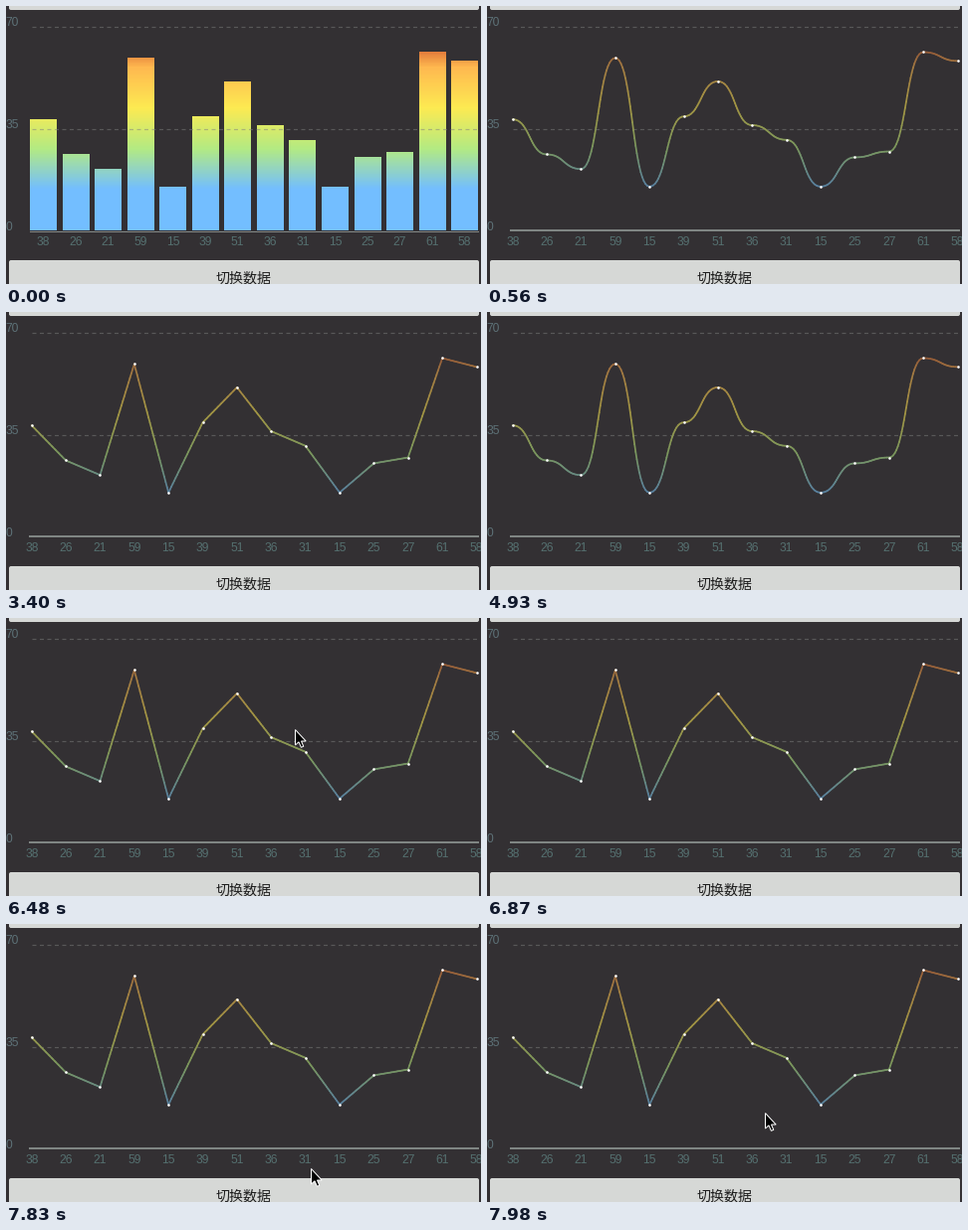
Animation, 477 px wide and 280 px high, one loop 8000 ms. Source, as a matplotlib script:

```python
import matplotlib.pyplot as plt
import numpy as np
from matplotlib.animation import FuncAnimation
from matplotlib.collections import LineCollection
from matplotlib.colors import LinearSegmentedColormap, to_rgb
from matplotlib.patches import FancyBboxPatch, PathPatch, Polygon
from matplotlib.path import Path

W, H, DPI = 477, 280, 72
LOOP, STEP = 8000, 20
VALUES = [38, 26, 21, 59, 15, 39, 51, 36, 31, 15, 25, 27, 61, 58]
N = len(VALUES)
TOP, BASE, PEAK = 20, 226, 70
LEFT, RIGHT = 24, 474
BACK = "#333033"
HEAT = LinearSegmentedColormap.from_list("heat", [
    (0.0, "#b71c1c"), (0.2, "#ffb950"), (0.4, "#fdea52"),
    (0.6, "#b4eb82"), (0.8, "#73beff"), (1.0, "#73beff")])

plt.rcParams["font.family"] = "Liberation Sans"
fig = plt.figure(figsize=(W / DPI, H / DPI), dpi=DPI, facecolor=BACK)
ax = fig.add_axes([0, 0, 1, 1])


def height(v):
    return BASE - v * (BASE - TOP) / PEAK


def label(x, y, text, ha="center", color="#557070"):
    return ax.text(x, y, text, size=12, ha=ha, va="baseline", color=color)


def button(y, h):
    ax.add_patch(FancyBboxPatch((5, y + 2), 468, h - 4, lw=0, fc="#d6d8d6",
                                boxstyle="round,pad=2,rounding_size=2"))


def heat_line(x, y):
    """Thin line tinted by height and dimmed toward the background."""
    pts = np.column_stack([x, y])
    mid = (y[1:] + y[:-1]) / 2
    tint = HEAT((mid - TOP) / (BASE - TOP))[:, :3]
    rgb = 0.55 * tint + 0.45 * np.array(to_rgb(BACK))
    segs = np.stack([pts[:-1], pts[1:]], axis=1)
    return ax.add_collection(LineCollection(
        segs, colors=rgb, linewidths=1.7, capstyle="round", zorder=3))


# Bars: one gradient clipped to all rectangles
bar_w = 26.8
bar_x = LEFT + np.arange(N) * (RIGHT - LEFT - bar_w) / (N - 1)
rects = []
for x, v in zip(np.round(bar_x), VALUES):
    r, t = x + 26.5, round(height(v))
    rects.append(Path([(x, BASE), (x, t), (r, t), (r, BASE), (x, BASE)],
                      closed=True))
ramp = HEAT(np.linspace(0, 1, BASE - TOP))[:, None, :]
bars = ax.imshow(ramp, extent=(LEFT, RIGHT + 1, BASE, TOP), aspect="auto",
                 interpolation="nearest", zorder=1)
ax.set(xlim=(0, W), ylim=(H, 0))
ax.axis("off")
bars.set_clip_path(PathPatch(Path.make_compound_path(*rects),
                             transform=ax.transData))
bar_axis, = ax.plot([LEFT, RIGHT], [226.5] * 2, color="#858b89", lw=1, zorder=2)
bar_labels = [label(x + bar_w / 2, 241, v) for x, v in zip(bar_x, VALUES)]

# Line charts: smooth with flat tangents at each point, and straight
px = np.linspace(25.7, 472.5, N)
py = np.array([height(v) for v in VALUES])
s = np.linspace(0, 1, 25)[:-1]
bx = 1.5 * s * (1 - s) + s ** 3
by = s * s * (3 - 2 * s)
dx, dy = np.diff(px)[:, None], np.diff(py)[:, None]


def joined(p, d, ease):
    return np.append((p[:-1, None] + d * ease).ravel(), p[-1])


smooth = heat_line(joined(px, dx, bx), joined(py, dy, by))
straight = heat_line(joined(px, dx, s), joined(py, dy, s))
dots, = ax.plot(px, py, "o", ms=2.6, mew=0, color="white", zorder=4)
line_axis, = ax.plot([LEFT, RIGHT], [226] * 2, color="#7f8583", lw=2, zorder=2)
line_labels = [label(x, 241, v) for x, v in zip(px, VALUES)]

# Fixed parts
for v in (35, 70):
    ax.plot([26, RIGHT], [height(v) + 0.5] * 2, color="#808080", alpha=0.5,
            lw=1.2, dashes=(4 / 1.2, 3.5 / 1.2), dash_capstyle="butt", zorder=2)
for v in (0, 35, 70):
    label(-0.5, height(v), v, "left", "#5d7177")
button(-20, 24)
button(256, 40)
ax.text(239, 279, "切换数据", family="Noto Sans CJK JP", size=14,
        ha="center", va="baseline", color="#1e1e1e")

ARROW = np.array([(0.5, 0.5), (0.5, 16), (4, 12.8), (6.4, 18.3),
                  (8.8, 17.3), (6.5, 12), (11.2, 12)])
cursor = ax.add_patch(Polygon(ARROW, fc="black", ec="white", lw=1, zorder=9))

bar_parts = [bars, bar_axis, *bar_labels]
line_parts = [dots, line_axis, *line_labels]


def cursor_at(t):
    if 6360 <= t < 6870:
        u = min((t - 6360) // 120, 3) / 3
        k = 1 - (1 - u) ** 1.5
        return np.round([273 + 37 * k, 73 + 85 * k])
    if 7830 <= t < 7980:
        return np.array([306, 246])
    if t >= 7980:
        return np.array([279, 190])
    return None


def draw(i):
    t = i * STEP + STEP // 2
    is_bar = t < 560
    is_smooth = 560 <= t < 3400 or 4930 <= t < 6080
    for part in bar_parts:
        part.set_visible(is_bar)
    for part in line_parts:
        part.set_visible(not is_bar)
    smooth.set_visible(is_smooth)
    straight.set_visible(not is_bar and not is_smooth)
    tip = cursor_at(t)
    cursor.set_visible(tip is not None)
    if tip is not None:
        cursor.set_xy(ARROW + tip)
    return []


anim = FuncAnimation(fig, draw, frames=LOOP // STEP, interval=STEP,
                     repeat=True, repeat_delay=0, blit=False)
plt.show()
```
